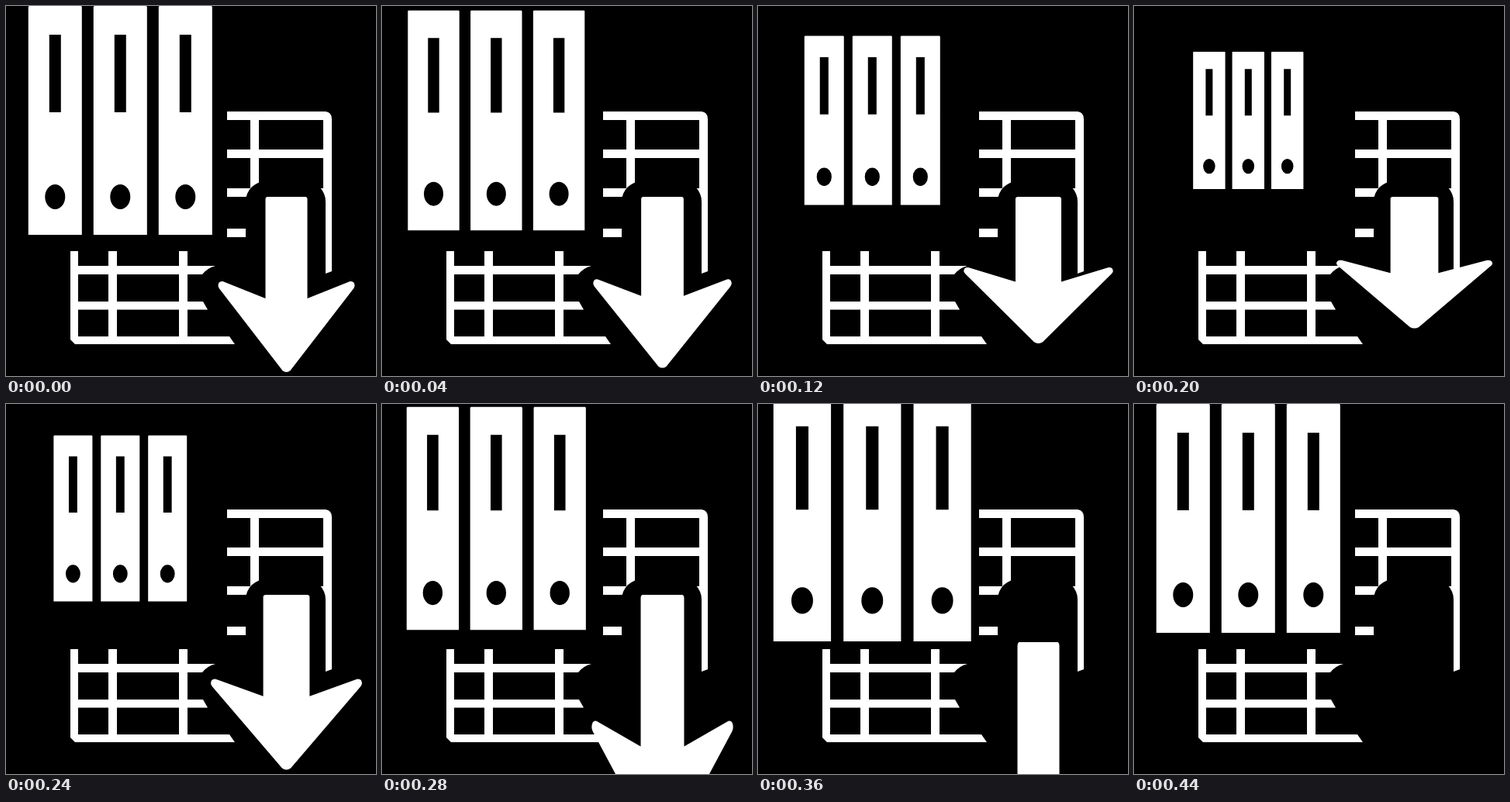
Animation of 477x477 px, one loop 1.04 s. Source, as an HTML page:

```html
<!DOCTYPE html>
<html>
<head>
<meta charset="utf-8">
<style>
  html, body { margin: 0; width: 100%; height: 100%; overflow: hidden; background: #000; }
  svg { display: block; width: 100vw; height: 100vh; }
</style>
</head>
<body>
<svg viewBox="0 0 477 477" fill="#fff">
  <!-- upper shelf, with a rounded clearing for the arrow -->
  <path d="M285 136H412Q420 137 420 146V342L412 345H409V147H326V185H409V196H326V235H409V246H285V235H315V196H285V185H315V147H285Z"/>
  <path d="M285 287H309V298H285Z"/>
  <path fill="#000" d="M309 350V252A26 26 0 0 1 335 226H386A26 26 0 0 1 412 252V350Z"/>
  <!-- lower shelf -->
  <path d="M83 316H93V426H288L295 436H89L83 430Z
           M132 316H143V426H132Z M223 316H234V426H223Z
           M93 335H270Q259 338 253 346H93Z M93 381H254L260 391.500H93Z"/>
  <g id="binders">
    <path id="binder" fill-rule="evenodd" d="M-33.500 -147.500H33.500L34.500 -146.500V147.500H-34.500V-146.500Z
      M-7.500 -110.500V-10.500H7.500V-110.500Z
      M-13 98.500A13 16 0 0 0 13 98.500A13 16 0 0 0 -13 98.500Z"/>
    <use href="#binder" x="-84"/>
    <use href="#binder" x="84"/>
  </g>
  <path id="arrow" d="M-24 0H24Q27 0 27 3V131L82 109Q88 108 88 115Q87 118 86 119L5 224Q0 228 -5 224L-86 119Q-87 118 -88 115Q-88 108 -82 109L-27 131V3Q-27 0 -24 0Z"/>
</svg>
<script>
  const LOOP = 1040, STEP = 40, LAST = 11;
  const binders = document.getElementById('binders');
  const arrow = document.getElementById('arrow');

  // Poses at each key step: binder scale, arrow x scale, y scale, top
  const keys = [
    [0, 1, 1, 1, 246],
    [5, 0.6, 1.143, 0.75, 246],
    [8, 1.1, 1, 1.74, 246],
    [11, 1, 1, 1.74, 490]
  ];

  function poseAt(step) {
    const i = step < 5 ? 0 : step < 8 ? 1 : 2;
    const a = keys[i], b = keys[i + 1];
    const p = (1 - Math.cos(Math.PI * (step - a[0]) / (b[0] - a[0]))) / 2;
    return a.map((v, n) => v + (b[n] - v) * p);
  }

  function draw(now) {
    const step = Math.min(LAST, Math.floor(now % LOOP / STEP));
    const [, size, sx, sy, top] = poseAt(step);
    binders.setAttribute('transform', `translate(147.3 147.5) scale(${size})`);
    arrow.setAttribute('transform', `translate(361.5 ${top}) scale(${sx} ${sy})`);
  }

  const start = performance.now();
  function tick() {
    draw(performance.now() - start);
    requestAnimationFrame(tick);
  }
  tick();
</script>
</body>
</html>
```
